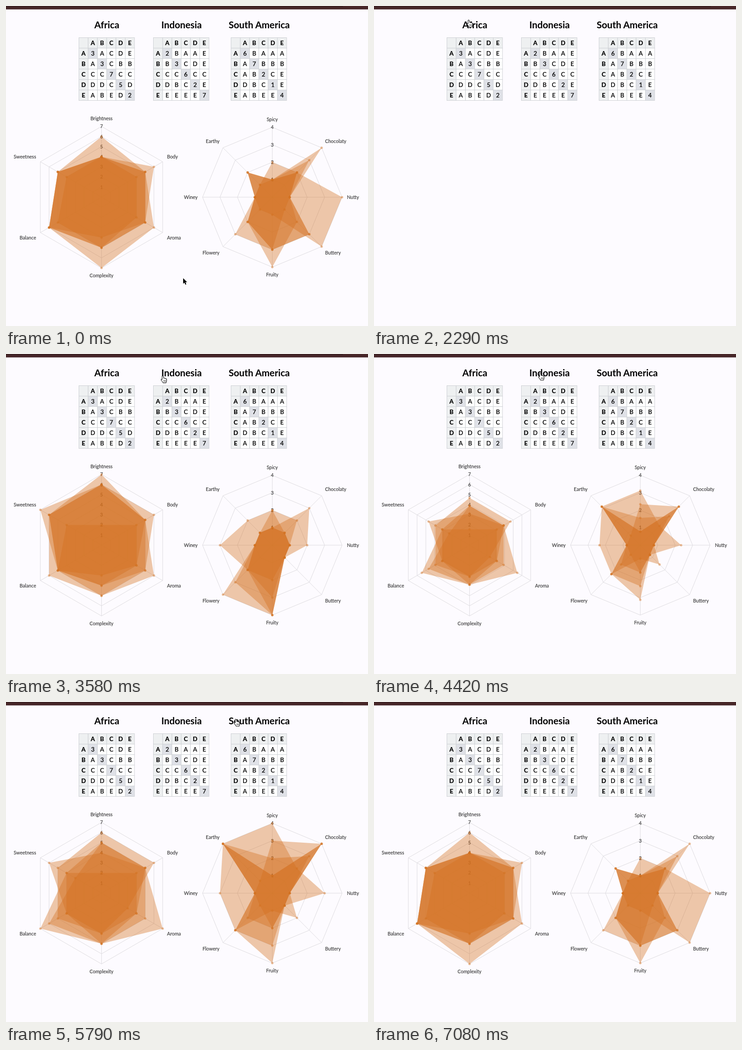
Write an HTML page that moves like this. It is 797 by 703 pixels and loops after 7.12 s.

```html
<!DOCTYPE html>
<html lang="en">
<head>
<meta charset="utf-8">
<title>Coffee flavour radar</title>
<style>
  html, body { margin: 0; width: 100%; height: 100%; overflow: hidden; background: #fdfbff; }
  svg { display: block; width: 797px; height: 703px; font-family: Lato, "Open Sans", sans-serif; }
  text { text-anchor: middle; fill: #000; }
  .title { font-size: 20.7px; font-weight: 700; }
  .cell { font-size: 13.3px; font-weight: 500; stroke: #000; stroke-width: .2; }
  .head { font-weight: 700; }
  .label, .tick { font-size: 10.5px; font-weight: 500; fill: #444; stroke: #444; stroke-width: .15; }
  .grid { fill: none; stroke: #dddbdf; stroke-width: 1; }
  .area, .dot { fill: #d2701e; fill-opacity: .38; }
  .dot { fill-opacity: .45; }
</style>
</head>
<body>
<svg id="stage" viewBox="0 0 797 703">
  <rect width="797" height="7.5" fill="#472628"/>
  <rect width="742" height="1.5" fill="#331a1c"/>
</svg>
<script>
const LOOP = 7120, GROW = 750;
const stage = document.getElementById('stage');

function add(parent, tag, attrs, text) {
  const node = document.createElementNS('http://www.w3.org/2000/svg', tag);
  for (const key in attrs) node.setAttribute(key, attrs[key]);
  if (text !== undefined) node.textContent = text;
  parent.append(node);
  return node;
}

// Origin tables
const tables = [
  { name: 'Africa', x: 160.5, mid: 222, rows: ['3ACDE', 'A3CBB', 'CC7CC', 'DDC5D', 'ABED2'] },
  { name: 'Indonesia', x: 324.5, mid: 386.5, rows: ['2BAAE', 'B3CDE', 'CC6CC', 'DBC2E', 'EEEE7'] },
  { name: 'South America', x: 495.5, mid: 557.5, rows: ['6BAAA', 'A7BBB', 'AB2CE', 'DBC1E', 'ABEE4'] }
];
const COL = 20.4, ROW = 23;

for (const table of tables) {
  add(stage, 'text', { class: 'title', x: table.mid, y: 49 }, table.name);
  const lines = [' ABCDE', ...table.rows.map((row, i) => 'ABCDE'[i] + row)];
  lines.forEach((line, r) => [...line].forEach((char, c) => {
    const head = !r || !c;
    const x = table.x + c * COL, y = 69.5 + r * ROW;
    add(stage, 'rect', {
      x, y, width: COL, height: ROW, stroke: '#cdd0d4',
      fill: head ? '#eef0f1' : r === c ? '#dfe1e7' : '#fff'
    });
    add(stage, 'text', { class: head ? 'cell head' : 'cell', x: x + COL / 2, y: y + 16.2 }, char);
  }));
}

// Radar charts
const radars = [
  { cx: 210.3, cy: 420, radius: 155.5, max: 7,
    axes: ['Brightness', 'Body', 'Aroma', 'Complexity', 'Balance', 'Sweetness'] },
  { cx: 586.3, cy: 420, radius: 153.6, max: 4,
    axes: ['Spicy', 'Chocolaty', 'Nutty', 'Buttery', 'Fruity', 'Flowery', 'Winey', 'Earthy'] }
];
// One digit per axis, one word per coffee
const samples = {
  africa: ['755456 665566 656557 244454 654356', '22114311 13214211 21113232 11114411 11112211'],
  indonesia: ['663455 455546 557574 244444 554563', '42312114 34113311 23114314 14121334 14112214'],
  south: ['655565 465565 456765 444554 455465', '22113211 14124212 12441111 13133212 12133312']
};

function spot(radar, axis, value) {
  const angle = axis * 2 * Math.PI / radar.axes.length;
  const r = radar.radius * value / radar.max;
  return [radar.cx + r * Math.sin(angle), radar.cy - r * Math.cos(angle)];
}
const join = points => points.map(p => p.map(n => n.toFixed(2)).join()).join(' ');

const charts = add(stage, 'g', {});
for (const radar of radars) {
  for (let level = 1; level <= radar.max; level++) {
    add(charts, 'polygon', { class: 'grid', points: join(radar.axes.map((_, i) => spot(radar, i, level))) });
  }
  radar.axes.forEach((name, i) => {
    const [x2, y2] = spot(radar, i, radar.max);
    add(charts, 'line', { class: 'grid', x1: radar.cx, y1: radar.cy, x2, y2 });
    const [x, y] = spot(radar, i, radar.max * 1.07);
    const side = Math.sign(Math.round(x - radar.cx)), drop = Math.sign(Math.round(y - radar.cy));
    add(charts, 'text', {
      class: 'label', x, y: y + 3.7 + drop * 6,
      style: 'text-anchor:' + ['end', 'middle', 'start'][side + 1]
    }, name);
  });
  for (let level = 1; level <= radar.max; level++) {
    const [x, y] = spot(radar, 0, level);
    add(charts, 'text', { class: 'tick', x, y: y + 3.8 }, level);
  }
}

function buildOrigin(codes) {
  const group = add(charts, 'g', {}), shapes = [];
  radars.forEach((radar, side) => {
    for (const code of codes[side].split(' ')) {
      const area = add(group, 'polygon', { class: 'area' });
      const dots = [...code].map(() => add(group, 'circle', { class: 'dot', r: 2.6 }));
      shapes.push({ radar, values: [...code].map(Number), area, dots });
    }
  });
  return { group, shapes };
}
const origins = {};
for (const name in samples) origins[name] = buildOrigin(samples[name]);

function drawOrigin({ shapes }, scale) {
  for (const { radar, values, area, dots } of shapes) {
    const points = values.map((v, i) => spot(radar, i, v * scale));
    area.setAttribute('points', join(points));
    dots.forEach((dot, i) => {
      dot.setAttribute('cx', points[i][0]);
      dot.setAttribute('cy', points[i][1]);
    });
  }
}

const scenes = [
  [-GROW, 'south'], [790, null], [2391, 'africa'], [3956, 'indonesia'], [5860, 'south']
];
const cubicInOut = k => k < .5 ? 4 * k ** 3 : 1 - 4 * (1 - k) ** 3;

// Pointer
const arrow = add(stage, 'path', {
  d: 'M0 0V12.2L2.8 9.6L4.9 14.2L7 13.2L5 8.8H8.8Z',
  fill: '#000', stroke: '#fff', 'stroke-width': 1, 'paint-order': 'stroke'
});
const hand = add(stage, 'g', {});
add(hand, 'path', {
  d: 'M-1.4 8V1.2Q-1.2 -.2 0 0Q1.2 0 1.5 1.5L2 5.2Q3.5 4.4 4.3 5.6Q5.7 5 6.5 6.3Q8.4 6 8.5 8V11Q8.2 13 7.2 15.5H.8Q-.7 12.6 -3.4 9.6Q-4 7.6 -2.6 7.3Z',
  fill: '#fff', stroke: '#111', 'stroke-width': 1.1, 'stroke-linejoin': 'round'
});
add(hand, 'path', { d: 'M2.2 9.5V13M4.2 9.5V13M6.2 9.5V13', stroke: '#111', 'stroke-width': .8 });

// Time, x, y
const path = [
  [0, 390, 598], [750, 381, 579], [1130, 381, 579], [1170, 368, 562], [1290, 245, 345],
  [1430, 245, 345], [1800, 218, 150], [2170, 208, 44], [2400, 209, 19], [2560, 211, 40],
  [2830, 212, 44], [3200, 240, 58], [3580, 345, 48], [3710, 354, 40], [3950, 362, 18],
  [4150, 364, 38], [4420, 366, 42], [5000, 380, 52], [5400, 440, 58], [5790, 506, 38],
  [5920, 510, 12], [6060, 514, -20], [LOOP, 514, -20]
];
const titleSpans = [[190, 254], [337, 436], [485, 630]];

function pointerAt(t) {
  const i = path.findIndex(step => step[0] > t);
  const [t0, x0, y0] = path[i - 1], [t1, x1, y1] = path[i];
  const k = (t - t0) / (t1 - t0);
  return [x0 + (x1 - x0) * k, y0 + (y1 - y0) * k];
}

function render(t) {
  const [start, name] = scenes.findLast(scene => scene[0] <= t);
  charts.style.display = name ? '' : 'none';
  for (const key in origins) origins[key].group.style.display = key === name ? '' : 'none';
  if (name) drawOrigin(origins[name], cubicInOut(Math.min(1, (t - start) / GROW)));

  const [x, y] = pointerAt(t);
  const onTitle = y < 60 && titleSpans.some(([from, to]) => x >= from && x <= to);
  arrow.style.display = onTitle ? 'none' : '';
  hand.style.display = onTitle ? '' : 'none';
  (onTitle ? hand : arrow).setAttribute('transform', `translate(${x.toFixed(1)} ${y.toFixed(1)})`);
}

const begin = performance.now();
function tick() {
  render((performance.now() - begin) % LOOP);
  requestAnimationFrame(tick);
}
tick();
</script>
</body>
</html>
```
